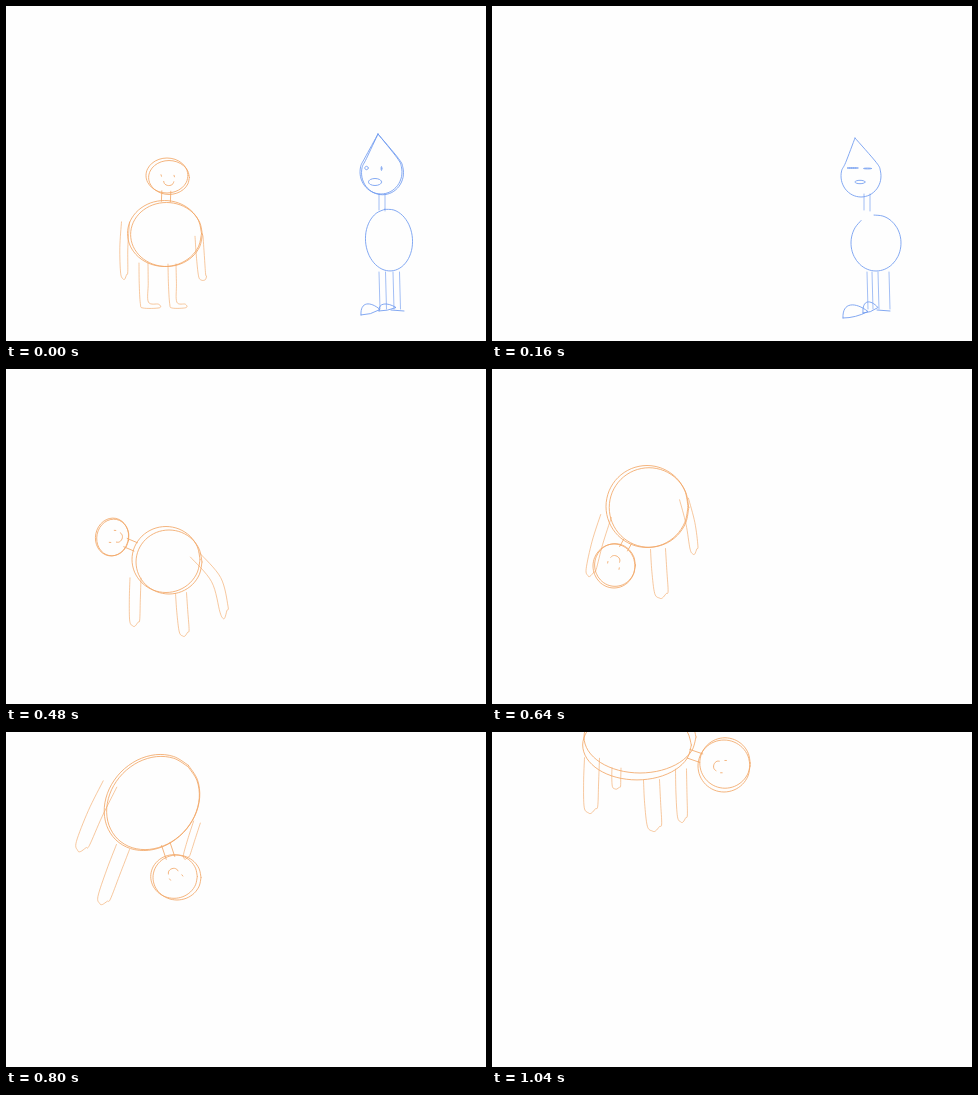
An HTML page that plays this animation: 480 px wide and 335 px high, repeating every 1.12 s.

```html
<!DOCTYPE html>
<html lang="en">
<head>
<meta charset="utf-8">
<title>Sketch loop</title>
<style>
  html, body { margin: 0; width: 100%; height: 100%; overflow: hidden; background: #fefefe; }
  svg { display: block; width: 100%; height: 100%; }
  path { fill: none; stroke-width: .85; stroke-linecap: round; stroke-linejoin: round; }
  .tumbler { stroke: #f2a868; }
  .talker { stroke: #6e9af0; }
  .soft { opacity: .75; }
</style>
</head>
<body>
<svg viewBox="0 0 480 335" preserveAspectRatio="none">
  <path id="limbs" class="tumbler soft"/>
  <path id="tumbler" class="tumbler"/>
  <path id="legs" class="talker soft"/>
  <path id="talker" class="talker"/>
</svg>
<script>
const STEP = 80, STEPS = 14, TAU = 2 * Math.PI;

// round: center x, y, radius x, y, tilt; slip: offset of the second pencil loop.
// limb: root x, y, tip x, y, width, bend, foot length in half widths.
const tumblerKeys = [
  { body: [158.5, 227.5, 37, 33, 0], slip: [2, 1], head: [161, 169.5, 21, 17.5, 0], headSlip: [2, 2],
    limbs: [[119.5, 216, 118, 273, 8, -1, 0], [166, 258, 167, 302, 8, 0, 3],
            [193, 230, 196, 274, 8, 0, .6], [137.5, 257, 138, 302, 9, 0, 3.2]] },
  { body: [160, 190.5, 34, 33, 0], slip: [3, 2.5], head: [106, 168, 16.5, 19, .2], headSlip: [.8, .5],
    limbs: [[129.5, 209, 128, 257, 11, 0, 0], [175, 224, 178, 267, 11, 0, 0], [189, 186, 218, 249, 10, 9, 0]] },
  { body: [155, 137.5, 41, 41, 0], slip: [2, 1], head: [122, 197, 21, 22, 0], headSlip: [1, -1],
    limbs: [[114, 147, 97, 207, 11, -1, 0], [166, 180, 169, 229, 15, 0, 0], [192, 130, 202, 185, 9, 2, 0]] },
  { body: [146, 70.5, 52, 43.5, -.8], slip: [1, .5], head: [171, 145.5, 24, 22.5, 0], headSlip: [-3, -1],
    limbs: [[104, 52, 73, 119, 15, -1, 0], [117, 115, 95, 172, 14, 0, 0], [191, 90, 179, 127, 7, 0, 0]] },
  { body: [148, 5, 56, 36, 0], slip: [-3, 8], head: [232, 34, 26, 26, 0], headSlip: [1, -3],
    limbs: [[100, 26, 98, 81, 15, 0, 0], [159.5, 48, 162, 99, 16, 0, 0],
            [189, 37, 190, 90, 11, 0, 0], [124.5, 36, 124, 57, 9, 0, 0]] }
];

// foot: left, right, ground, height.
const talkerKeys = [
  { head: [375, 166, 21, 22], tip: [372, 128], slip: 1.5, open: 1, mouth: [369, 176, 6.5, 3.5], neck: [376, 3],
    torso: [383, 234, 23.5, 31, -.08], gap: 0, legs: [373, 379.5, 387, 393.5],
    feet: [[355, 374, 309, 11], [373, 390, 305, 7]] },
  { head: [369, 170, 20, 21], tip: [363, 132], slip: 0, open: 0, mouth: [368, 176, 5, 1.7], neck: [375, 3],
    torso: [384, 237, 25, 28, 0], gap: .56, legs: [375, 380, 386, 397],
    feet: [[351, 376, 312, 13], [371, 386, 307, 11]] },
  { head: [367, 166, 20, 21.5], tip: [363, 133], slip: 0, open: 0, mouth: [366, 176, 4, 2.3], neck: [373, 2],
    torso: [384, 238, 28, 30, 0], gap: .6, legs: [376, 387, 387, 397],
    feet: [[351, 377, 311, 14], [369, 386, 308, 8]] }
];

const tumblerPlan = [0, , , , , .5, 1, 1.5, 2, 2.5, 3, 3.33, 3.67, 4];
const talkerPlan = [0, .5, 1, 1.5, 2];

const mix = (a, b, k) => a + (b - a) * k;

function blend(a, b, k) {
  if (typeof a === 'number') return mix(a, b, k);
  if (Array.isArray(a)) return a.slice(0, b.length).map((v, i) => blend(v, b[i], k));
  return Object.fromEntries(Object.keys(a).map(name => [name, blend(a[name], b[name], k)]));
}

// Smooth open line through the points.
function curve(points) {
  const at = i => points[Math.max(0, Math.min(points.length - 1, i))];
  let d = 'M' + points[0];
  for (let i = 0; i < points.length - 1; i++) {
    const [p, q, r, s] = [at(i - 1), at(i), at(i + 1), at(i + 2)];
    d += `C${q.map((v, j) => v + (r[j] - p[j]) / 6)} ${r.map((v, j) => v - (s[j] - q[j]) / 6)} ${r}`;
  }
  return d;
}

const line = (x1, y1, x2, y2) => `M${x1},${y1}L${x2},${y2}`;

function arc([cx, cy, rx, ry, tilt = 0], from = 0, span = TAU, count = 16) {
  const c = Math.cos(tilt), s = Math.sin(tilt);
  return Array.from({ length: count + 1 }, (_, i) => {
    const a = from + span * i / count, x = rx * Math.cos(a), y = ry * Math.sin(a);
    return [cx + x * c - y * s, cy + x * s + y * c];
  });
}

const oval = shape => curve(arc(shape));

function doubleOval([cx, cy, rx, ry, tilt], [dx, dy]) {
  return oval([cx, cy, rx, ry, tilt]) + oval([cx + dx, cy + dy, rx * .97, ry * .97, tilt]);
}

function limb([x1, y1, x2, y2, width, bend, foot]) {
  const dx = x2 - x1, dy = y2 - y1, length = Math.hypot(dx, dy);
  const at = (along, side) => {
    const off = (side * width / 2 + bend * Math.sin(Math.PI * along)) / length;
    return [x1 + dx * along + dy * off, y1 + dy * along - dx * off];
  };
  return curve([at(0, -1), at(.45, -1), at(.9, -.8), at(1, -.2),
    at(1, .2 + foot), at(.92, .7 + foot * .8), at(.87, 1), at(.45, 1), at(0, 1)]);
}

function headDirection({ body, head }) {
  const x = head[0] - body[0], y = head[1] - body[1];
  return { angle: Math.atan2(y, x), reach: Math.hypot(x, y) };
}

// The head swings anticlockwise around the body.
function blendTumbler(a, b, k) {
  const pose = blend(a, b, k), p = headDirection(a), q = headDirection(b);
  const turn = q.angle - p.angle;
  const angle = p.angle + (turn > 0 ? turn - TAU : turn) * k, reach = mix(p.reach, q.reach, k);
  pose.head[0] = pose.body[0] + reach * Math.cos(angle);
  pose.head[1] = pose.body[1] + reach * Math.sin(angle);
  return pose;
}

function drawTumbler({ body, slip, head, headSlip, limbs }) {
  const { angle, reach } = headDirection({ body, head });
  const c = Math.cos(angle), s = Math.sin(angle);
  const edge = ([, , rx, ry, tilt]) => 1 / Math.hypot(Math.cos(angle - tilt) / rx, Math.sin(angle - tilt) / ry);
  const from = edge(body) - 1, to = reach - edge(head) + 2;
  const neck = [-4.5, 4.5].map(w => line(
    body[0] + c * from - s * w, body[1] + s * from + c * w,
    body[0] + c * to - s * w, body[1] + s * to + c * w));
  // Face coordinates: x to the right, y towards the chin.
  const face = (x, y) => [head[0] - s * x - c * y, head[1] + c * x - s * y];
  const eyes = [-6, 7].map(x => line(...face(x, -.5), ...face(x + .5, 1)));
  const mouth = curve(arc([2, 6, 5, 4], 0, Math.PI, 6).map(p => face(...p)));
  return [limbs.map(limb).join(''),
    doubleOval(body, slip) + doubleOval(head, headSlip) + neck.join('') + eyes.join('') + mouth];
}

function foot([left, right, ground, height]) {
  const middle = (left + right) / 2, top = ground - height * 1.25;
  return `M${left},${ground}C${left - 1},${top} ${middle},${top} ${right},${ground - height / 2}`
    + `Q${middle},${ground} ${left},${ground}`;
}

function drawTalker({ head, tip, slip, open, mouth, neck, torso, gap, legs, feet }) {
  const drop = shift => curve([tip, ...arc([head[0] + shift, head[1] + shift / 2, head[2], head[3]],
    -.7, 4.54, 10), tip]);
  const eyes = oval([360.5, 162, mix(5.5, 1.7, open), mix(.4, 1.7, open)])
    + oval([375.5, 162.5, mix(4, .4, open), mix(.4, 2, open)]);
  const [x, half] = neck, hip = torso[1] + torso[3];
  return [
    legs.map(v => line(v, hip + 1, v + 1, 303)).join('')
      + line(x - half, 188, x - half, 204) + line(x + half, 188, x + half, 205),
    drop(0) + (slip ? drop(slip) : '') + eyes + oval(mouth)
      + curve(arc(torso, -1.65, TAU - gap)) + feet.map(foot).join('') + line(385, 304, 398, 305)
  ];
}

function drawings(keys, plan, mixer, draw) {
  return Array.from({ length: STEPS }, (_, i) => {
    if (plan[i] === undefined) return ['', ''];
    const from = Math.floor(plan[i]), k = plan[i] - from;
    return draw(k ? mixer(keys[from], keys[from + 1], k) : keys[from]);
  });
}

const find = id => document.getElementById(id);
const actors = [
  [[find('limbs'), find('tumbler')], drawings(tumblerKeys, tumblerPlan, blendTumbler, drawTumbler)],
  [[find('legs'), find('talker')], drawings(talkerKeys, talkerPlan, blend, drawTalker)]
];

function render(time) {
  const step = Math.floor(time / STEP) % STEPS;
  for (const [paths, shapes] of actors)
    paths.forEach((path, i) => path.setAttribute('d', shapes[step][i]));
}

const start = performance.now();
function tick() {
  render(performance.now() - start);
  requestAnimationFrame(tick);
}
tick();
</script>
</body>
</html>
```
